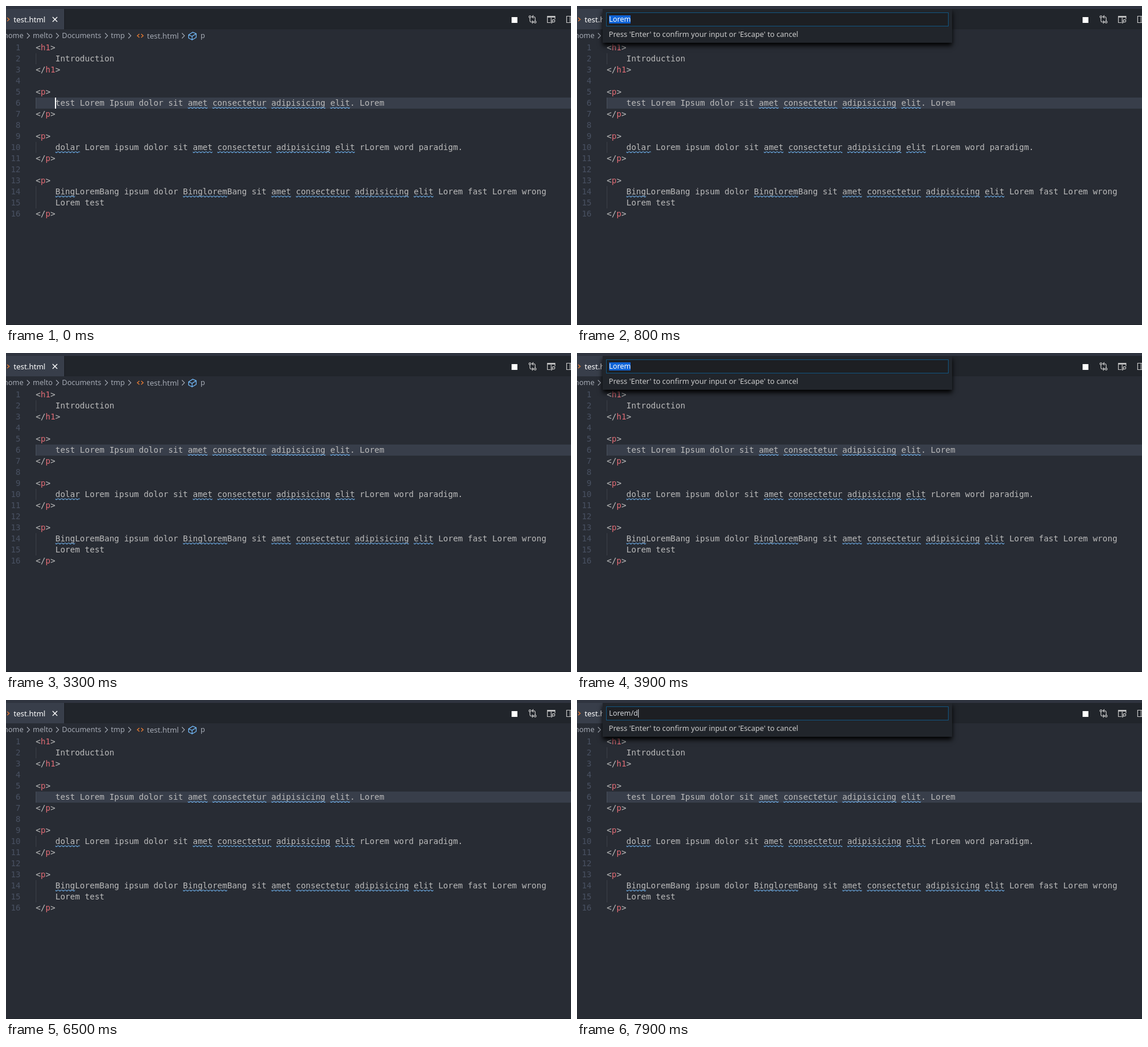
Animation, 970 px wide and 547 px high, one loop 8 s. Source, as an HTML page:

```html
<!DOCTYPE html>
<html lang="en">
<head>
<meta charset="utf-8">
<title>Editor: select up to a word</title>
<style>
html, body { margin: 0; width: 100%; height: 100%; overflow: hidden; background: #282c34; }
#stage { position: relative; width: 970px; height: 547px; overflow: hidden; background: #282c34;
  font: 12.6px "Noto Sans", "Open Sans", sans-serif; color: #a3a8b2; white-space: pre; }
#stage div, #stage svg, pre { position: absolute; margin: 0; }
#art { left: 0; top: 0; }
#title { left: 0; top: 0; width: 970px; height: 5px; background: #2f343f; z-index: 3; }
#tabs { left: 0; top: 5px; width: 970px; height: 35px; background: #21252b; }
#tab { left: 0; top: 0; width: 100px; height: 35px; background: #383e4a; border-right: 1px solid #181a1f; }
#foot { left: 0; top: 546px; width: 970px; height: 1px; background: #1f2329; }
.ui { line-height: 20px; }
pre { top: 62px; font: 14px/19px "DejaVu Sans Mono", monospace; }
#code { left: 51px; color: #bbb; }
#code b { font-weight: normal; color: #e06c75; }
#nums { left: 0; width: 25px; text-align: right; color: #495162; }
#line { left: 52px; top: 157px; width: 918px; height: 19px; background: #383e4a; }
#sel { left: 84.7px; top: 157px; height: 19px; background: #404859; border-radius: 3px; }
#caret { left: 84px; top: 157px; width: 2px; height: 19px; background: #fff; }
#pop { left: 44px; top: 5px; width: 600px; background: #21252b; box-shadow: 0 5px 8px #000; color: #ccc; z-index: 2; }
#box { left: 6px; top: 6px; width: 586px; height: 22px; background: #1d1f23; border: 1px solid #125580; }
#val { left: 4px; top: 4px; height: 14px; font-size: 12.4px; line-height: 14px; color: #d0d3d8; border-right: 1px solid #d0d3d8; }
#val.picked { background: #0f63d6; color: #fff; border: 0; }
#msg { left: 10.5px; top: 33px; font-size: 12.65px; }
#list { left: 0; top: 36px; width: 600px; }
#list div { width: 590px; height: 22px; padding-left: 10px; line-height: 22px; }
#list div:first-child { background: #383e4a; }
</style>
</head>
<body>
<div id="stage">
  <div id="title"></div>
  <div id="tabs"><div id="tab"></div></div>
  <div id="line"></div>
  <div id="sel"></div>
  <pre id="nums"></pre>
  <pre id="code"></pre>
  <svg id="art" width="970" height="547" fill="none">
    <defs>
      <pattern id="wave" width="6" height="3" patternUnits="userSpaceOnUse">
        <path d="M5.5 0L2.5 3H1.1L4.1 0ZM4 0L6 2V.6L5.4 0ZM0 2L1 3H2.4L0 .6Z" fill="#75beff"/>
      </pattern>
    </defs>
    <path d="M2 20l3.5 3-3.5 3" stroke="#e37933" stroke-width="1.4"/>
    <path d="M80 19l8 8M88 19l-8 8" stroke="#fff" stroke-width="1.4"/>
    <path d="M229 48l-3.5 3 3.5 3M232 48l3.5 3-3.5 3" stroke="#e37933" stroke-width="1.4"/>
    <path d="M313.5 49.5L320.5 45l6 2.5v6.5l-7 4-6-3zM313.5 49.5l6 2.5 7-4.5M319.5 52v6" stroke="#75beff" stroke-width="1.2"/>
    <rect x="868" y="19" width="10" height="10" fill="#fff"/>
    <g stroke="#c5c5c5" stroke-width="1.2">
      <circle cx="899.5" cy="18.5" r="1.7"/><circle cx="908.5" cy="27.5" r="1.7"/>
      <path d="M899.5 20v5q0 2.5 2.5 2.5h3M908.5 26v-5q0-2.5-2.5-2.5h-3M903 25l2.5 2.5-2.5 2.5M905.5 16l-2.5 2.5 2.5 2.5"/>
      <path d="M935 28.5h-5.5v-11h13v5M936 20v8.5"/>
      <path d="M929.5 18.5h13" stroke-width="2.5"/>
      <circle cx="940" cy="25.5" r="2.2"/><path d="M938.5 27l-2.5 2.8"/>
      <path d="M971 17.5h-8.5v11h8.5M968.5 17.5v11"/>
    </g>
  </svg>
  <div id="caret"></div>
  <div id="foot"></div>
  <div id="pop">
    <div id="box"><div id="val"></div></div>
    <div id="msg" class="ui">Press 'Enter' to confirm your input or 'Escape' to cancel</div>
    <div id="list"></div>
  </div>
</div>
<script>
const $ = id => document.getElementById(id);
const ADVANCE = 8.428, LINE = 19, TOP = 62, LOOP = 8000;

const source = `<h1>
    Introduction
</h1>

<p>
    test Lorem Ipsum dolor sit amet consectetur adipisicing elit. Lorem
</p>

<p>
    dolar Lorem ipsum dolor sit amet consectetur adipisicing elit rLorem word paradigm.
</p>

<p>
    BingLoremBang ipsum dolor BingloremBang sit amet consectetur adipisicing elit Lorem fast Lorem wrong
    Lorem test
</p>`;
const lines = source.split("\n");
$("code").innerHTML = source.replace(/<(\/?)(\w+)>/g, "&lt;$1<b>$2</b>&gt;");
$("nums").textContent = lines.map((_, i) => i + 1).join("\n");

function label(text, x, y, color, size) {
  const el = document.createElement("div");
  el.className = "ui";
  el.textContent = text;
  el.style.cssText = `left:${x}px;top:${y - 10}px;color:${color};font-size:${size}px`;
  $("stage").insertBefore(el, $("caret"));
}
function shape(tag, attrs) {
  const el = document.createElementNS($("art").namespaceURI, tag);
  for (const key in attrs) el.setAttribute(key, attrs[key]);
  $("art").append(el);
}

// Spelling marks and indent guides
lines.forEach((line, i) => {
  const y = TOP + i * LINE;
  for (const m of line.matchAll(/Binglorem|Bing(?=L)|dolar|amet|consectetur|adipisicing|elit/g))
    shape("rect", { width: m[0].length * ADVANCE, height: 3, fill: "url(#wave)",
      transform: `translate(${51 + m.index * ADVANCE} ${y + 16})` });
  if (line.startsWith(" "))
    shape("rect", { x: 51, y, width: 1, height: LINE, fill: i == 5 ? "#4a505c" : "#3b4048" });
});

label("test.html", 13, 23, "#fff", 13);
const gray = "#a3a8b2";
[["home", -4], ["melto", 46], ["Documents", 96], ["tmp", 180], ["p", 334]]
  .forEach(([text, x]) => label(text, x, 51, gray, 12.5));
label("test.html", 242, 51, gray, 13);
for (const x of [38, 88, 172, 212, 304])
  shape("path", { d: `M${x - 2} 46.5l4.5 4.5-4.5 4.5`, stroke: gray, "stroke-width": 1.1 });

const commands = ["Select Up To Word", "Select All", "Expand Selection", "Shrink Selection", "Fold All", "Unfold All",
  "Format Document", "Go to Line...", "Go to Symbol...", "Join Lines", "Sort Lines Ascending", "Sort Lines Descending",
  "Toggle Line Comment", "Toggle Block Comment", "Toggle Word Wrap", "Transform to Lowercase", "Transform to Uppercase",
  "Trim Trailing Whitespace"];
commands.forEach((name, i) => {
  const row = document.createElement("div");
  row.textContent = name;
  row.style.top = i * 22 + "px";
  $("list").append(row);
});

// Each step: start time and what is on view
const on = { caret: 1 }, off = {}, palette = { text: ">", list: 1 }, picked = { text: "Lorem", picked: 1 };
const steps = [
  [0, on], [100, off], [300, palette], [800, picked],
  [1800, { caret: 1, sel: 5 }], [2300, { sel: 5 }], [2800, on], [3300, off],
  [3500, palette], [3900, picked], [4400, { text: "Lorem" }], [4800, { text: "Lorem/" }], [4900, { text: "Lorem/e" }],
  [5100, on], [5200, { caret: 1, sel: 11 }], [5700, { sel: 11 }], [6000, on], [6500, off],
  [6700, palette], [7000, picked], [7400, { text: "Lorem/e" }], [7700, { text: "Lorem/" }], [7900, { text: "Lorem/d" }]
];
const show = (id, visible) => $(id).style.display = visible ? "block" : "none";

let current;
function draw() {
  const t = performance.now() % LOOP;
  const state = steps.findLast(([start]) => start <= t)[1];
  if (state !== current) {
    current = state;
    const { caret, sel, text, list, picked } = state;
    show("caret", caret);
    show("line", !sel);
    show("sel", sel);
    $("sel").style.width = (sel || 0) * ADVANCE + "px";
    show("pop", text);
    show("list", list);
    show("msg", !list);
    $("pop").style.height = (list ? 438 : 58) + "px";
    $("val").textContent = text || "";
    $("val").className = picked ? "picked" : "";
  }
  requestAnimationFrame(draw);
}
draw();
</script>
</body>
</html>
```
